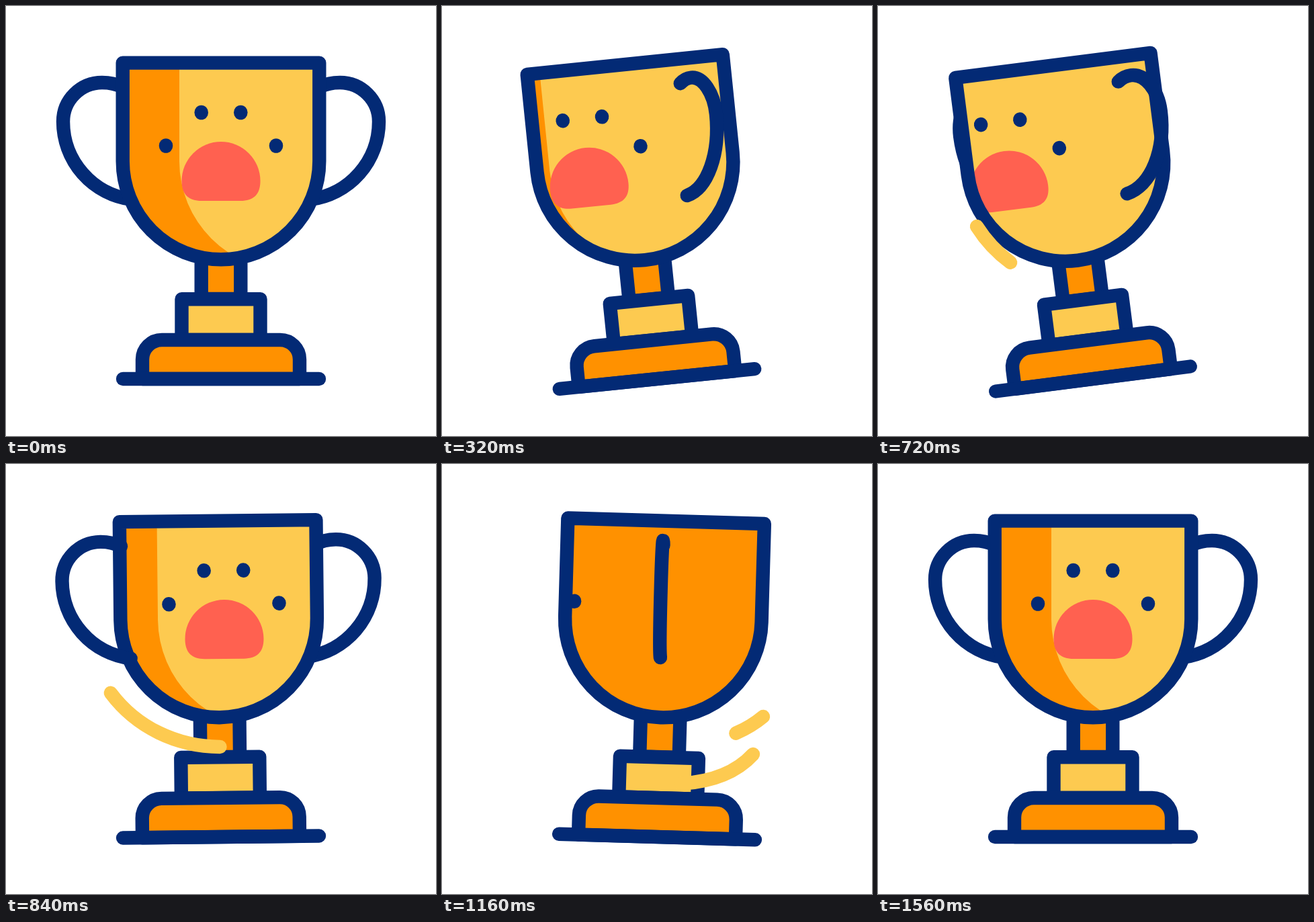
These frames come from a looping animation (640 by 640 pixels, 2.4 s). An HTML page with a canvas:

```html
<!DOCTYPE html>
<html lang="en">
<head>
<meta charset="utf-8">
<title>Spinning trophy</title>
<style>
  html, body { margin: 0; width: 100%; height: 100%; overflow: hidden; background: #fff; }
  canvas { display: block; width: 640px; height: 640px; }
</style>
</head>
<body>
<canvas id="stage" width="640" height="640"></canvas>
<script>
const LOOP = 2400, STEP = 20;
const NAVY = '#032a75', ORANGE = '#ff9100', GOLD = '#fdca50', CORAL = '#ff6150';
const LINE = 20.4;
const WIND = 600;    // end of the wind-up
const FLIP = 820;    // the other handle comes to the front
const HIDDEN = 1160; // the face is behind the cup
const REST = 1540;

const canvas = document.getElementById('stage');
const ctx = canvas.getContext('2d');
const dpr = window.devicePixelRatio || 1;
canvas.width = canvas.height = 640 * dpr;

// Smooth 0 to 1 between two times.
function ease(t, from, to) {
  const p = Math.min(1, Math.max(0, (t - from) / (to - from)));
  return p * p * (3 - 2 * p);
}

// Degrees around the foot: wind up, swing over, rock back, settle.
const tilt = t => -10.6 * ease(t, 0, WIND) + 15.7 * ease(t, WIND, 1005)
  - 7.05 * ease(t, 1005, 1320) + 1.95 * ease(t, 1320, 1560);

// The face leaves on the right and returns from the left, slowing down.
function faceX(t) {
  if (t < HIDDEN) return -129.5 * ease(t, 0, WIND) + 349.5 * ease(t, WIND, HIDDEN);
  return -215 * (Math.max(0, REST - t) / (REST - HIDDEN)) ** 2;
}

// Edges of the golden side.
function goldLeft(t) {
  if (t < WIND) return 258 - 119 * ease(t, 0, WIND);
  if (t < HIDDEN) return 111 + 355 * ease(t, WIND, 1220);
  return 165 + 93 * ease(t, 1300, REST);
}
const goldRight = t => t < HIDDEN ? 700 : 174 + 1.25 * (t - HIDDEN);

// Horizontal scale of the handle in front: 1 is far right, -1 far left.
const frontScale = t => t < FLIP
  ? 1 - .832 * (ease(t, 0, WIND) - ease(t, WIND, FLIP))
  : 2 * ease(t, 810, 1520) - 1;

const cup = new Path2D('M173.7 84.6H466.3V231A146.3 146.3 0 0 1 173.7 231Z');
const stem = new Path2D('M290.7 372V436H349.3V372');
const block = new Path2D('M261.5 497V436.3H378.5V497Z');
const base = new Path2D('M203 555V526A29 29 0 0 1 232 497H408A29 29 0 0 1 437 526V555Z');
const ground = new Path2D('M174 555H466');
const mouth = new Path2D('M261.5 260.5A58.5 58.5 0 0 1 378.5 260.5C378.5 281 368 290 349 290H291C272 290 261.5 281 261.5 260.5Z');
const handle = new Path2D('M146 121C156 116 166 114 177 114A58 58 0 0 1 235 172A117 117 0 0 1 133 288');

function trail(d) {
  const el = document.createElementNS('http://www.w3.org/2000/svg', 'path');
  el.setAttribute('d', d);
  return { path: new Path2D(d), len: el.getTotalLength() };
}
const upperTrail = trail('M147 328C185 388 250 421 320 421C378 421 436 411 478 376');
const lowerTrail = trail('M325 476C380 478 430 468 463 432');

function stroke(path, color = NAVY) {
  ctx.strokeStyle = color;
  ctx.stroke(path);
}

function fill(path, color) {
  ctx.fillStyle = color;
  ctx.fill(path);
}

function drawHandle(scale) {
  const p = new Path2D();
  p.addPath(handle, new DOMMatrix([scale, 0, 0, 1, 320, 0]));
  stroke(p);
}

// Orange on the outer side of a curved edge; dir -1 is left, 1 is right.
function drawShade(x, dir, r) {
  const far = 320 + dir * 500;
  const p = new Path2D();
  p.moveTo(x, 70);
  p.arc(x - dir * r, 231, r, dir > 0 ? 0 : Math.PI, Math.PI / 2, dir < 0);
  p.lineTo(far, 231 + r);
  p.lineTo(far, 70);
  fill(p, ORANGE);
}

function drawDot(x, y) {
  const p = new Path2D();
  p.ellipse(x, y, 10.3, 10.8, 0, 0, 2 * Math.PI);
  fill(p, NAVY);
}

function drawCup(t) {
  ctx.save();
  ctx.clip(cup);
  fill(cup, GOLD);
  drawShade(goldLeft(t), -1, 163);
  drawShade(goldRight(t), 1, 190);
  ctx.translate(320 + faceX(t), 0);
  for (const side of [-1, 1]) {
    drawDot(side * 29.3, 158.5);
    drawDot(side * 82, 208);
  }
  ctx.translate(-320, 0);
  fill(mouth, CORAL);
  ctx.restore();
  stroke(cup);
}

function drawTrail({ path, len }, tail, head) {
  if (head <= tail) return;
  ctx.setLineDash([len * (head - tail), len * 2]);
  ctx.lineDashOffset = -len * tail;
  stroke(path, GOLD);
  ctx.setLineDash([]);
}

function draw(t) {
  ctx.setTransform(dpr, 0, 0, dpr, 0, 0);
  ctx.fillStyle = '#fff';
  ctx.fillRect(0, 0, 640, 640);
  ctx.lineWidth = LINE;
  ctx.lineCap = ctx.lineJoin = 'round';

  ctx.save();
  ctx.translate(320, 555);
  ctx.rotate(tilt(t) * Math.PI / 180);
  ctx.translate(-320, -555);

  const front = frontScale(t);
  const spread = Math.abs(front) === 1;
  drawHandle(-front);
  if (spread) drawHandle(front);
  for (const [path, color] of [[stem, ORANGE], [block, GOLD], [base, ORANGE]]) {
    fill(path, color);
    stroke(path);
  }
  stroke(ground);
  drawCup(t);
  if (!spread) drawHandle(front);
  ctx.restore();

  drawTrail(upperTrail, ease(t, 780, 1270), ease(t, 580, 1070));
  drawTrail(lowerTrail, ease(t, 1060, 1400), ease(t, 900, 1150));
}

const began = performance.now();
function tick() {
  const t = (performance.now() - began) % LOOP;
  draw(Math.floor(t / STEP) * STEP);
  requestAnimationFrame(tick);
}
tick();
</script>
</body>
</html>
```
